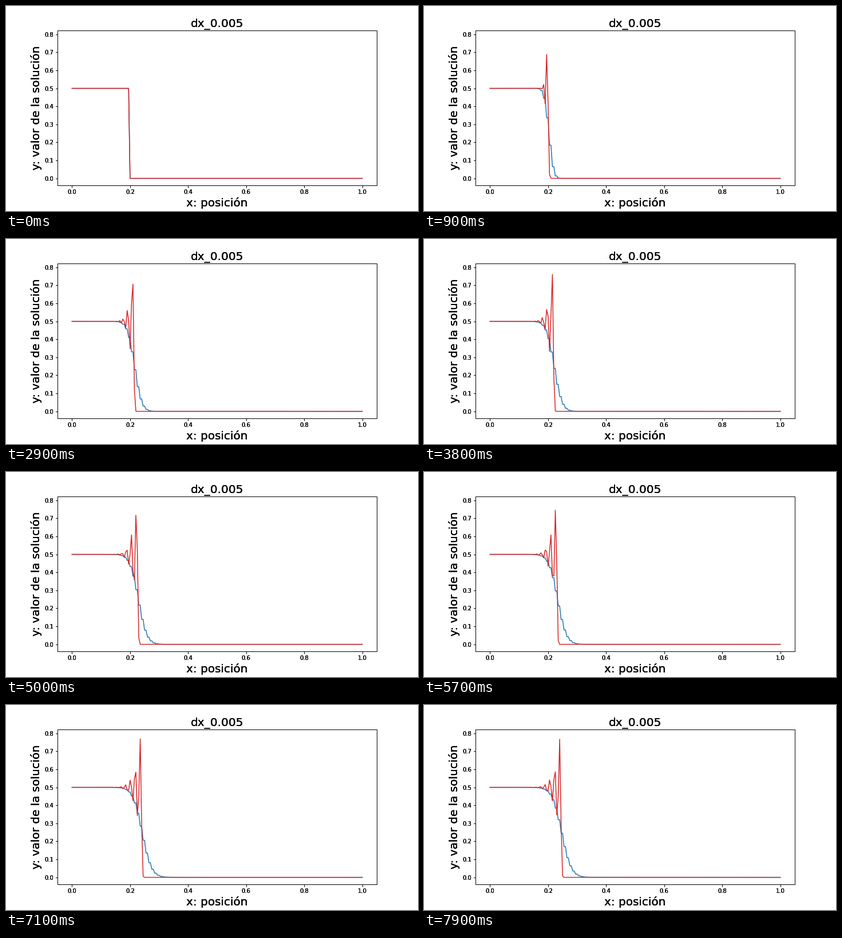
These frames come from a looping animation (720 by 360 pixels, 8000 ms). A matplotlib script:

```python
import numpy as np
import matplotlib.pyplot as plt
from matplotlib.animation import FuncAnimation

plt.rcParams.update({"font.family": "DejaVu Sans", "font.size": 10})

STEPS = 80
CELLS = 200
RATIO = 0.5  # dt / dx
LAYERS = 3   # stacked axes give the text its heavy, hard edges


def flux(u):
    return u ** 2 / 2


def lax_friedrichs(u):
    new = u.copy()
    new[1:-1] = (u[2:] + u[:-2]) / 2 - RATIO / 2 * (flux(u[2:]) - flux(u[:-2]))
    return new


def lax_wendroff(u):
    """Two-step Richtmyer form."""
    half = (u[1:] + u[:-1]) / 2 - RATIO / 2 * np.diff(flux(u))
    new = u.copy()
    new[1:-1] -= RATIO * np.diff(flux(half))
    return new


def solve(scheme, u):
    states = [u]
    for _ in range(STEPS - 1):
        states.append(scheme(states[-1]))
    return np.array(states)


x = np.linspace(0, 1, CELLS + 1)
start = np.where(np.arange(CELLS + 1) < CELLS // 5, 0.5, 0.0)
smooth = solve(lax_friedrichs, start)
wavy = solve(lax_wendroff, start)
peak = wavy.max()

fig = plt.figure(figsize=(10, 5), dpi=72, facecolor="white")
fig.subplots_adjust(left=0.125, right=0.9, bottom=0.125, top=0.88)


def add_axes(visible):
    ax = fig.add_subplot()
    ax.patch.set_visible(visible)
    ax.set_xlim(-0.05, 1.05)
    ax.set_ylim(-0.05 * peak, 1.05 * peak)
    ax.set_title("dx_0.005", fontsize=20)
    ax.set_xlabel("x: posición", fontsize=20)
    ax.set_ylabel("y: valor de la solución", fontsize=20)
    return ax


ax = [add_axes(k == 0) for k in range(LAYERS)][0]
blue, = ax.plot(x, start, color="tab:blue", lw=1.5)
red, = ax.plot(x, start, color="tab:red", lw=1.5)


def update(n):
    blue.set_ydata(smooth[n])
    red.set_ydata(wavy[n])
    return blue, red


anim = FuncAnimation(fig, update, frames=STEPS, interval=100,
                     repeat=True, repeat_delay=0)
plt.show()
```
